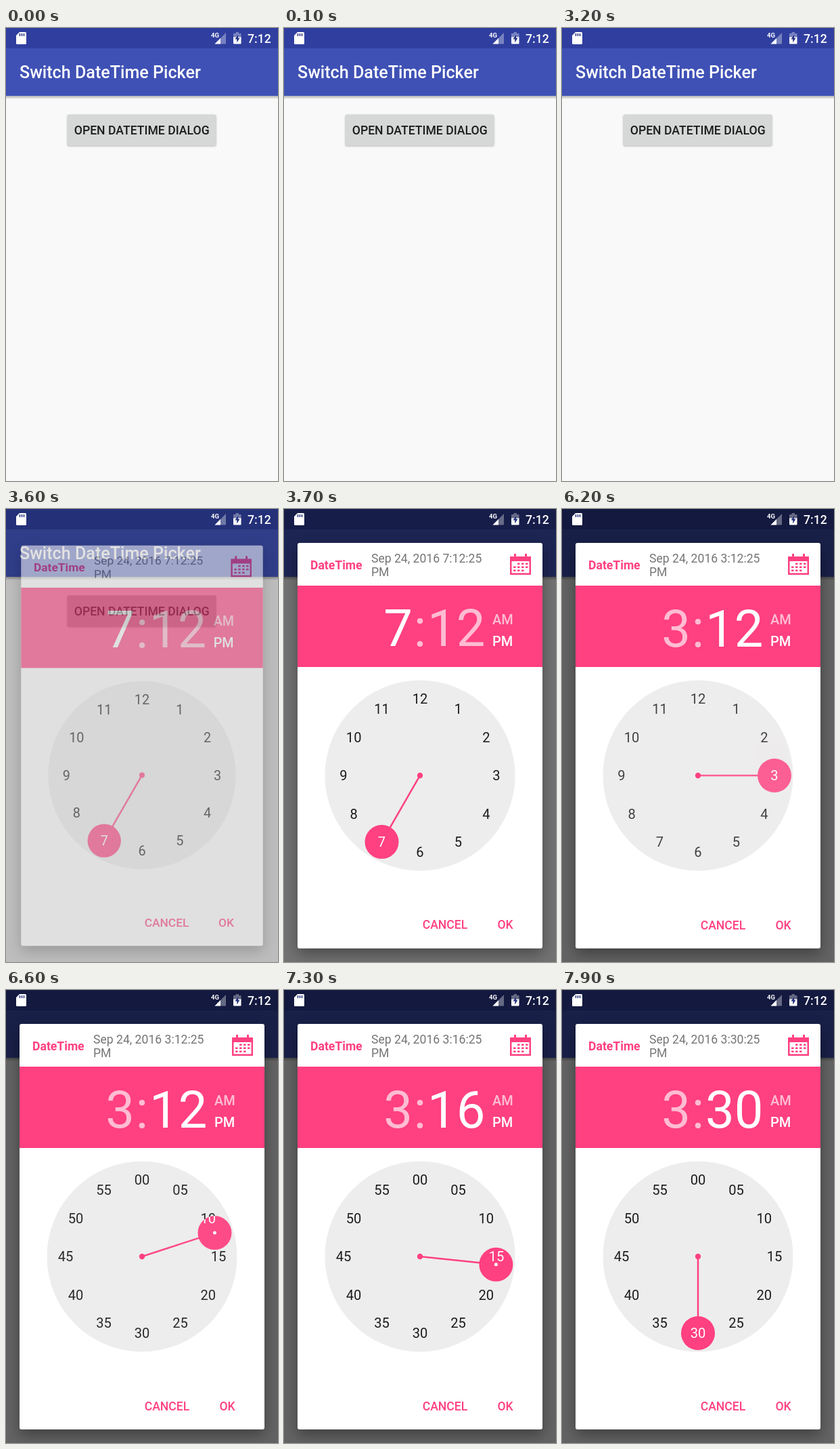
Recreate the animation shown at these times as an HTML page. Size 402 by 668 pixels, loop 8 s.

```html
<!DOCTYPE html>
<html lang="en">
<head>
<meta charset="utf-8">
<title>Switch DateTime Picker</title>
<style>
  html, body { margin: 0; width: 402px; height: 668px; overflow: hidden; background: #f9f9f9; }
  svg { display: block; }
  text { font-family: Roboto, Arial, sans-serif; font-size: 17.6px; white-space: pre; }
  .medium { font-weight: 500; }
  .pink { fill: #ff4081; }
  .white { fill: #fff; }
  .mid { text-anchor: middle; }
  .big { font-size: 76px; }
  .num { font-size: 20.1px; text-anchor: middle; }
  #dialog { transform-origin: 201px 349px; }
  #card { filter: drop-shadow(0 8px 10px rgba(0, 0, 0, .35)); }
  #button { filter: drop-shadow(0 1px 1px rgba(0, 0, 0, .25)); }
</style>
</head>
<body>
<svg width="402" height="668" viewBox="0 0 402 668">
  <defs>
    <linearGradient id="shade" x2="0" y2="1">
      <stop stop-opacity=".3"/><stop offset="1" stop-opacity="0"/>
    </linearGradient>
    <clipPath id="buttonClip"><rect x="90.5" y="127.5" width="220" height="46" rx="2.5"/></clipPath>
  </defs>

  <rect width="402" height="668" fill="#f9f9f9"/>
  <rect y="100" width="402" height="5" fill="url(#shade)"/>
  <rect y="30" width="402" height="70" fill="#3f51b5"/>
  <rect width="402" height="30" fill="#303f9f"/>
  <text class="medium white" x="20" y="74" style="font-size:25.1px">Switch DateTime Picker</text>
  <rect id="button" x="90.5" y="127.5" width="220" height="46" rx="2.5" fill="#d6d7d7"/>
  <circle id="ripple" cx="201" cy="150" clip-path="url(#buttonClip)"/>
  <text class="medium mid" x="200.7" y="157" fill="#1c1c1c">OPEN DATETIME DIALOG</text>

  <rect id="scrim" width="402" height="668"/>

  <g class="white">
    <path d="M20 6H28.5Q30 6 30 7.500V22.500Q30 24 28.500 24H16.500Q15 24 15 22.500V11Z"/>
    <path d="M20.500 8v4M23.500 8v4M26.500 8v4" stroke="#26327f" stroke-width="1.5"/>
    <text x="303" y="14" style="font-size:9.5px;font-weight:700">4G</text>
    <path d="M325 7V23.500H308.500Z" opacity=".35"/>
    <path d="M317 15V23.500H308.500Z"/>
    <path d="M336 8h3.500v-2h4.500v2h3.500v7h-11.500z" opacity=".35"/>
    <path d="M336 13.500h11.500v9q0 1-1 1h-9.500q-1 0-1-1z"/>
    <path d="M343 10l-4.500 6.500h2.700v5l4.300-6.700h-2.500z" fill="#26327f"/>
    <text class="medium" x="357" y="21.500">7:12</text>
  </g>

  <g id="dialog">
    <rect id="card" x="20" y="50" width="362" height="598" rx="3" fill="#fff"/>
    <text class="pink" x="39" y="89" font-weight="700">DateTime</text>
    <text id="date" x="129" y="79" fill="#757575"></text>
    <text x="129" y="99" fill="#757575">PM</text>
    <g id="calendar" class="pink">
      <path d="M334 70h31v27h-31zM336.500 77v17.500h26v-17.500z" fill-rule="evenodd"/>
      <path d="M340 66h3v6h-3zM356 66h3v6h-3z"/>
    </g>
    <rect x="20" y="113" width="362" height="120" class="pink"/>
    <g class="white">
      <text id="hour" class="big" x="190" y="202.500" text-anchor="end"></text>
      <text class="big mid" x="201" y="202.500" opacity=".65">:</text>
      <text id="minute" class="big" x="212" y="202.500"></text>
      <text class="medium" x="308" y="170" opacity=".65" style="font-size:20px">AM</text>
      <text class="medium" x="308" y="202" style="font-size:20px">PM</text>
    </g>
    <circle cx="201" cy="393" r="140.500" fill="#ededed"/>
    <g id="faces"></g>
    <circle cx="201" cy="393" r="4.200" class="pink"/>
    <text class="medium pink mid" x="238" y="619.500">CANCEL</text>
    <text class="medium pink mid" x="327" y="619.500">OK</text>
  </g>
</svg>
<script>
const LOOP = 8000, CX = 201, CY = 393, RADIUS = 113;
const $ = id => document.getElementById(id);
const clamp = x => Math.max(0, Math.min(1, x));
const progress = (t, start, length) => clamp((t - start) / length);
const smooth = x => (1 - Math.cos(Math.PI * x)) / 2;
const mix = (a, b, x) => a + (b - a) * x;

function add(parent, tag, attrs = {}, text = '') {
  const el = document.createElementNS('http://www.w3.org/2000/svg', tag);
  for (const key in attrs) el.setAttribute(key, attrs[key]);
  el.textContent = text;
  return parent.appendChild(el);
}
function set(el, attrs) {
  for (const key in attrs) el.setAttribute(key, attrs[key]);
}
function polar(turn, r = RADIUS) {
  const a = turn * 2 * Math.PI;
  return [CX + r * Math.sin(a), CY - r * Math.cos(a)];
}

// A dial of twelve labels; labels under the knob turn white.
function makeFace(id, label) {
  const group = add($('faces'), 'g');
  const clip = add(add(group, 'clipPath', { id }), 'circle', { r: 25 });
  const labels = attrs => {
    const g = add(group, 'g', attrs);
    for (let i = 0; i < 12; i++) {
      const [x, y] = polar(i / 12);
      add(g, 'text', { class: 'num', x, y: y + 7.2 }, label(i));
    }
  };
  labels({ fill: '#1c1c1c' });
  const hand = add(group, 'line', { x1: CX, y1: CY, stroke: '#ff4081', 'stroke-width': 2.5 });
  const knob = add(group, 'circle', { r: 25, class: 'pink' });
  labels({ class: 'white', 'clip-path': `url(#${id})` });
  const dot = add(group, 'circle', { r: 2.5, class: 'white' });

  return (turn, opacity) => {
    const [x, y] = polar(turn);
    set(hand, { x2: x, y2: y });
    for (const c of [clip, knob, dot]) set(c, { cx: x, cy: y });
    const onLabel = Math.abs(turn * 12 - Math.round(turn * 12)) < .01;
    dot.setAttribute('opacity', onLabel ? 0 : 1);
    group.setAttribute('opacity', opacity);
  };
}

const hourFace = makeFace('hourKnob', i => i || 12);
const minuteFace = makeFace('minuteKnob', i => String(i * 5).padStart(2, '0'));

for (let row = 0; row < 3; row++)
  for (let col = 0; col < 4; col++)
    if (!(row === 0 && col === 0) && !(row === 2 && col === 3))
      add($('calendar'), 'rect', { x: 339 + col * 6, y: 79.5 + row * 5, width: 3.5, height: 2.5 });

function hourAt(t) {
  return t < 5000 ? 7 : t < 5300 ? 6 : t < 5500 ? 5 : t < 5700 ? 4 : 3;
}
function minuteAt(t) {
  const m = t < 7300 ? mix(12, 16, progress(t, 7000, 300)) : mix(16, 30, progress(t, 7300, 580));
  return Math.round(m);
}

function draw(t) {
  const press = progress(t, 3210, 300);
  set($('ripple'), {
    r: mix(10, 115, press),
    opacity: .12 * progress(t, 3210, 80) * (1 - progress(t, 3600, 200))
  });

  const open = progress(t, 3520, 200);
  $('scrim').setAttribute('opacity', .6 * open);
  $('dialog').style.opacity = progress(t, 3520, 150);
  $('dialog').style.transform = `scale(${mix(1, .9, (1 - open) ** 4)})`;

  const hour = hourAt(t), minute = minuteAt(t), pickMinutes = t >= 5900;
  $('date').textContent = `Sep 24, 2016 ${hour}:${minute}:25`;
  $('hour').textContent = hour;
  $('minute').textContent = minute;
  $('hour').setAttribute('opacity', pickMinutes ? .65 : 1);
  $('minute').setAttribute('opacity', pickMinutes ? 1 : .65);

  hourFace(hour / 12, 1 - smooth(progress(t, 6060, 500)));
  minuteFace(minute / 60, smooth(progress(t, 6185, 500)));
}

const begin = performance.now();
function tick() {
  draw((performance.now() - begin) % LOOP);
  requestAnimationFrame(tick);
}
tick();
</script>
</body>
</html>
```
